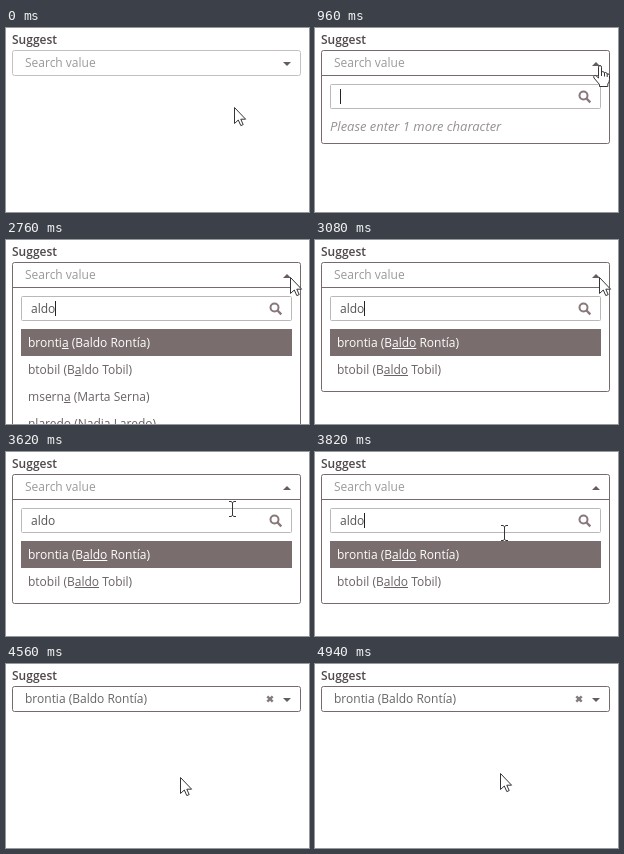
Recreate the animation shown at these times as an HTML page with a canvas. Size 303 by 184 pixels, loop 6240 ms.

```html
<!DOCTYPE html>
<html lang="en">
<head>
<meta charset="utf-8">
<title>Suggest field</title>
<style>
  html, body { margin: 0; width: 100%; height: 100%; overflow: hidden; background: #fff; }
  canvas { display: block; width: 303px; height: 184px; }
</style>
</head>
<body>
<canvas id="stage" width="303" height="184"></canvas>
<script>
const ctx = document.getElementById('stage').getContext('2d');
const LOOP = 6240;
const FAMILY = '"Open Sans", "Noto Sans", sans-serif';
const REGULAR = '12px ' + FAMILY;
const BOLD = '600 12px ' + FAMILY;
const ITALIC = 'italic 13px ' + FAMILY;
const DARK = '#766a6b';

const PEOPLE = ['brontia (Baldo Rontía)', 'btobil (Baldo Tobil)'];
const EVERYONE = [...PEOPLE, 'mserna (Marta Serna)', 'nlaredo (Nadia Laredo)'];

// Typed text by time
const TYPING = [[0, ''], [2040, 'a'], [2560, 'al'], [2640, 'ald'], [2760, 'aldo']];

const HAND = new Path2D('M5.5 11.5V2.2Q5.5 .5 7 .5T8.5 2.2V7.2Q9 6.5 10 6.6T11.5 8' +
  'Q12.2 7.2 13 7.5T14.2 9Q16.5 8.4 16.5 10.5V14.5Q16.5 17 14.8 19V21.5H6.5V19.5' +
  'L1 13Q0 11.4 1.4 10.7T4 11.6L5.5 13Z');
const KNUCKLES = new Path2D('M8.5 7V11M11.5 8V11.5M14.2 9V12');
const ARROW = new Path2D('M.5 .5V16.5L4.3 13L6.8 18.6L9.2 17.6L6.8 12.2H11.6Z');
const BEAM = new Path2D('M-3 -7.5H-1L.5 -6.5L2 -7.5H4M.5 -6.5V6.5M-3 7.5H-1L.5 6.5L2 7.5H4');

const part = (t, a, b) => Math.min(1, Math.max(0, (t - a) / (b - a)));
const mix = (a, b, u) => a + (b - a) * u;
const easeOut = u => 1 - (1 - u) * (1 - u);
const smooth = u => u * u * (3 - 2 * u);

function text(str, x, y, color, font = REGULAR) {
  ctx.font = font;
  ctx.fillStyle = color;
  ctx.fillText(str, x, y);
}

function widthOf(str) {
  ctx.font = REGULAR;
  return ctx.measureText(str).width;
}

function box(x, y, w, h, color, radius) {
  ctx.beginPath();
  ctx.roundRect(x + .5, y + .5, w - 1, h - 1, radius);
  ctx.strokeStyle = color;
  ctx.lineWidth = 1;
  ctx.stroke();
}

function triangle(up) {
  const [base, tip] = up ? [38, 34] : [34, 38];
  ctx.fillStyle = '#665c5d';
  ctx.beginPath();
  ctx.moveTo(277, base);
  ctx.lineTo(285, base);
  ctx.lineTo(281, tip);
  ctx.fill();
}

function line(x1, y1, x2, y2) {
  ctx.beginPath();
  ctx.moveTo(x1, y1);
  ctx.lineTo(x2, y2);
  ctx.stroke();
}

function magnifier() {
  ctx.strokeStyle = '#8a7779';
  ctx.lineWidth = 2;
  ctx.beginPath();
  ctx.arc(268.5, 67.5, 4, 0, 2 * Math.PI);
  ctx.stroke();
  ctx.lineWidth = 2.4;
  line(271.5, 70.5, 275.3, 74.3);
}

function clearMark() {
  ctx.strokeStyle = '#857b7c';
  ctx.lineWidth = 2.4;
  line(261.3, 32.3, 266.7, 37.7);
  line(266.7, 32.3, 261.3, 37.7);
}

function row(name, i, match) {
  const y = 89 + 27 * i;
  const color = i ? '#6a6263' : '#fff';
  if (!i) {
    ctx.fillStyle = '#796d6e';
    ctx.fillRect(15, y, 271, 27);
  }
  text(name, 22, y + 18, color);
  const at = name.indexOf(match);
  ctx.fillRect(22 + widthOf(name.slice(0, at)), y + 19, widthOf(match), 1);
}

function typedAt(t) {
  return TYPING.filter(([at]) => at <= t).pop()[1];
}

function caretOn(t) {
  if (t < 1680) return t < 1320;
  if (t < 3300) return true;
  return t >= 3660 && t < 4020;
}

function panel(t) {
  const typed = typedAt(t);
  const all = t >= 2420 && t < 2840;
  const found = t >= 3020;
  const bottom = all ? 206 : found ? 152 : 116;

  box(6, 22, 289, bottom - 22, DARK, 2);
  ctx.fillStyle = DARK;
  ctx.fillRect(6, 47, 289, 1);
  text('Search value', 19, 39, '#999');
  triangle(true);

  box(15, 56, 271, 25, '#bdb8b8', 1);
  magnifier();
  text(typed, 25, 73, '#555');
  if (caretOn(t)) {
    ctx.fillStyle = '#222';
    ctx.fillRect(Math.round(25 + widthOf(typed)), 61, 1, 15);
  }

  if (all) EVERYONE.forEach((name, i) => row(name, i, 'a'));
  else if (found) PEOPLE.forEach((name, i) => row(name, i, 'aldo'));
  else text(t < 2140 ? 'Please enter 1 more character' : 'Searching...', 15, 103, '#979192', ITALIC);
}

function pointer(t) {
  if (t < 960) {
    const u = smooth(part(t, 60, 240));
    const y = mix(79, 37, u);
    return { x: mix(228, 284, u), y, kind: y < 48 ? 'hand' : 'arrow' };
  }
  if (t < 4300) {
    const u = part(t, 3420, 4060);
    const y = mix(37, 112, u ** 1.13);
    const kind = t < 1040 ? 'hand' : y < 56 ? 'arrow' : y < 82 ? 'beam' : y < 89 ? 'arrow' : 'hand';
    return { x: mix(284, 174, easeOut(u)), y, kind };
  }
  const drop = part(t, 4540, 4680);
  const end = smooth(part(t, 4800, 4940));
  return {
    x: mix(174, 185, end),
    y: mix(mix(112, 116, drop), 109, end),
    kind: t < 4340 ? 'hand' : 'arrow'
  };
}

function drawPointer({ x, y, kind }) {
  ctx.save();
  ctx.translate(Math.round(x) - (kind === 'hand' ? 6 : 0), Math.round(y));
  ctx.lineWidth = 1;
  ctx.lineJoin = 'round';
  ctx.strokeStyle = '#34343a';
  ctx.fillStyle = '#fff';
  if (kind === 'beam') {
    ctx.stroke(BEAM);
  } else {
    const shape = kind === 'hand' ? HAND : ARROW;
    ctx.fill(shape);
    ctx.stroke(shape);
    if (kind === 'hand') ctx.stroke(KNUCKLES);
  }
  ctx.restore();
}

function draw(t) {
  ctx.fillStyle = '#fff';
  ctx.fillRect(0, 0, 303, 184);
  text('Suggest', 6, 16, '#4f4748', BOLD);

  if (t >= 960 && t < 4300) {
    panel(t);
  } else {
    const chosen = t >= 4300;
    box(6, 22, 289, 26, chosen ? DARK : '#c4c0c0', 2);
    text(chosen ? PEOPLE[0] : 'Search value', 19, 39, chosen ? '#666' : '#999');
    if (chosen) clearMark();
    triangle(false);
  }
  drawPointer(pointer(t));
}

const start = performance.now();
function tick() {
  draw((performance.now() - start) % LOOP);
  requestAnimationFrame(tick);
}
tick();
</script>
</body>
</html>
```
